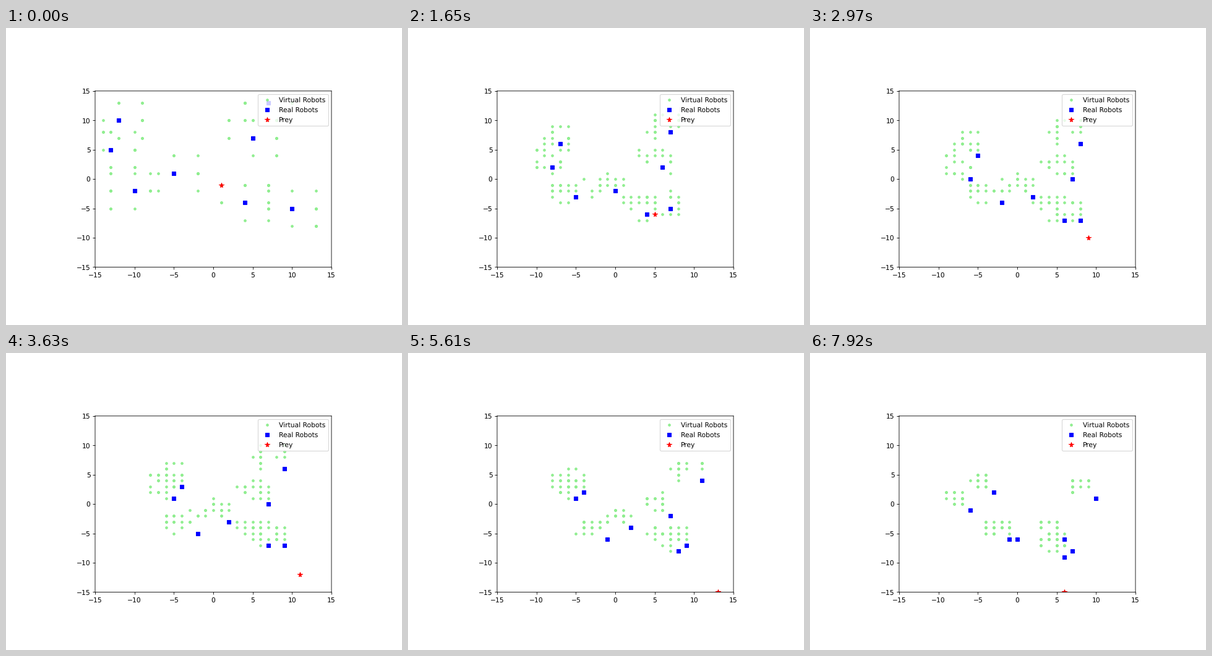
A matplotlib script for the animation above (8 s loop, 640 px wide and 480 px high).

```python
import numpy as np
import matplotlib.pyplot as plt
from matplotlib.animation import FuncAnimation

W, H, DPI = 640, 480, 77
LOOP, STEP, TICK = 8000, 330, 20     # ms
LEFT, RIGHT, TOP, BOTTOM = 144.0, 526.0, 101.8, 386.5
EDGE = 15                            # half width of the arena

plt.rcParams["text.hinting"] = "none"

# Way points of the real robots at these steps
KEYS = [0, 3, 7, 15, 24]
PATHS = np.array([
    [(-12, 10), (-9, 7), (-5, 4), (-4, 2), (-3, 2)],
    [(-13, 5), (-10, 4), (-6, 0), (-5, 1), (-6, -1)],
    [(-10, -2), (-7, -2), (-3, -4), (-1, -6), (-1, -6)],
    [(-5, 1), (-2, -1), (1, -3), (3, -3), (0, -6)],
    [(4, -4), (2, -5), (5, -7), (9, -8), (6, -9)],
    [(10, -5), (7, -4), (7, -7), (10, -7), (7, -8)],
    [(5, 7), (4, 4), (7, 0), (7, -1), (6, -6)],
    [(7, 13), (6, 10), (7, 6), (11, 5), (10, 1)],
])

# Every real robot leads a swarm of virtual ones
SWARM = 16
TRAIL = np.array([-1.8, 1.5])
rng = np.random.default_rng(4)
offsets = rng.uniform(-1, 1, (len(PATHS), SWARM, 2))


def to_grid(points):
    return np.floor(np.asarray(points) + 0.5)


def robots_at(step):
    return to_grid([[np.interp(step, KEYS, axis) for axis in path.T]
                    for path in PATHS])


def swarms_at(step):
    """Wide, coarse swarms tighten and fall behind their leaders."""
    spread = np.interp(step, [0, 3, 24], [4.4, 2.2, 1.5])
    cell = np.interp(step, [0, 3], [3, 1])
    lag = np.interp(step, [0, 7], [0, 1])
    centre = robots_at(step)[:, None] + lag * TRAIL
    dots = to_grid(centre + cell * to_grid(offsets * spread / cell))
    return np.clip(dots.reshape(-1, 2), 1 - EDGE, EDGE - 2)


def prey_at(step):
    """Diagonally down to the corner, then back along the bottom edge."""
    return max(1, EDGE - abs(step - EDGE)), max(-step - 1, -EDGE)


# The hair added to the size keeps rounding from losing a pixel
fig = plt.figure(figsize=((W + 0.01) / DPI, (H + 0.01) / DPI), dpi=DPI)
ax = fig.add_axes([LEFT / W, 1 - BOTTOM / H,
                   (RIGHT - LEFT) / W, (BOTTOM - TOP) / H])
ax.set(xlim=(-EDGE, EDGE), ylim=(-EDGE, EDGE))
ax.set_xticks(range(-EDGE, EDGE + 1, 5))
ax.set_yticks(range(-EDGE, EDGE + 1, 5))
for spine in ax.spines.values():
    spine.set_snap(False)

virtual, = ax.plot([], [], "o", color="lightgreen", ms=3.3, label="Virtual Robots")
real, = ax.plot([], [], "s", color="blue", ms=5, label="Real Robots")
prey, = ax.plot([], [], "*", color="red", ms=7.5, label="Prey")
ax.legend(loc="upper right")


def draw(i):
    step = (i * TICK + TICK // 2) // STEP
    virtual.set_data(*swarms_at(step).T)
    real.set_data(*robots_at(step).T)
    x, y = prey_at(step)
    prey.set_data([x], [y])
    return virtual, real, prey


anim = FuncAnimation(fig, draw, frames=LOOP // TICK, interval=TICK,
                     repeat=True, repeat_delay=0)
plt.show()
```
